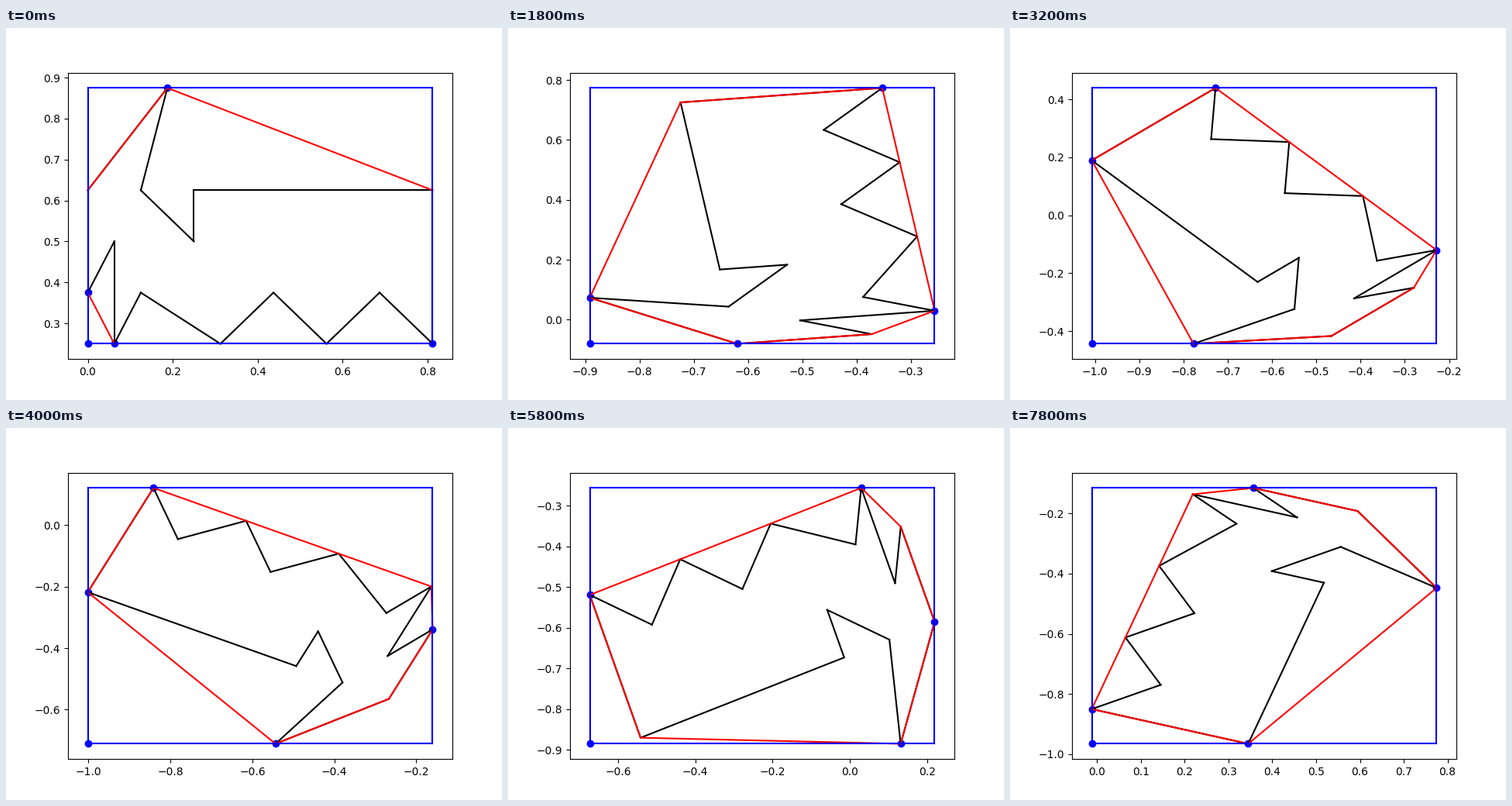
Write a matplotlib script that moves like this. It is 640 px wide and 480 px high and loops after 8000 ms.

```python
import numpy as np
import matplotlib.pyplot as plt
from matplotlib.animation import FuncAnimation

FRAMES = 40
INTERVAL = 200
STEP = 0.1  # radians per numbered pose
DOT = 3     # room left around the dots, in pixels

# Outline on a grid of sixteenths
SHAPE = np.array([
    (0, 6), (1, 8), (1, 4), (2, 6), (5, 4), (7, 6), (9, 4), (11, 6),
    (13, 4), (13, 10), (4, 10), (4, 8), (2, 10), (3, 14), (0, 10),
]) / 16

# Poses play in alphabetical order of their numbers: 1, 10, 11, ..., 19, 2, 20, ...
POSES = sorted(range(1, 64), key=str)[:FRAMES]


def rotate(points, angle):
    c, s = np.cos(angle), np.sin(angle)
    return points @ np.array([[c, s], [-s, c]])


def half_hull(points):
    chain = []
    for p in points:
        while len(chain) > 1:
            a, b = chain[-2], chain[-1]
            turn = (b[0] - a[0]) * (p[1] - a[1]) - (b[1] - a[1]) * (p[0] - a[0])
            if turn > 1e-9:
                break
            chain.pop()
        chain.append(p)
    return chain[:-1]


def convex_hull(points):
    ordered = sorted(points.tolist())
    return np.array(half_hull(ordered) + half_hull(ordered[::-1]))


def plot_edges(points, color):
    # One line per edge, so that straight edges snap to whole pixels
    ends = np.stack([points, np.roll(points, -1, axis=0)])
    ax.plot(ends[..., 0], ends[..., 1], color=color)


def draw(frame):
    ax.clear()
    # Usual 5% margin, widened on each side to make room for the dots
    ax.margins(*(0.05 + 1.1 * DOT * 1.1 / ax.bbox.size))

    pts = rotate(SHAPE, (POSES[frame] - 1) * STEP)
    # Rounding keeps ties stable, so the first tied corner is marked
    rounded = pts.round(9)
    low, high = pts.min(axis=0), pts.max(axis=0)

    plot_edges(pts, "black")
    plot_edges(convex_hull(rounded), "red")

    extremes = np.concatenate([rounded.argmin(axis=0), rounded.argmax(axis=0)])
    marks = np.vstack([pts[extremes], low])
    ax.scatter(*marks.T, color="blue")
    box = np.array([low, (high[0], low[1]), high, (low[0], high[1])])
    plot_edges(box, "blue")
    return ax.lines


fig, ax = plt.subplots(figsize=(6.4, 4.8), dpi=100)
anim = FuncAnimation(fig, draw, frames=FRAMES, init_func=lambda: draw(0),
                     interval=INTERVAL, repeat=True, repeat_delay=0)
plt.show()
```
